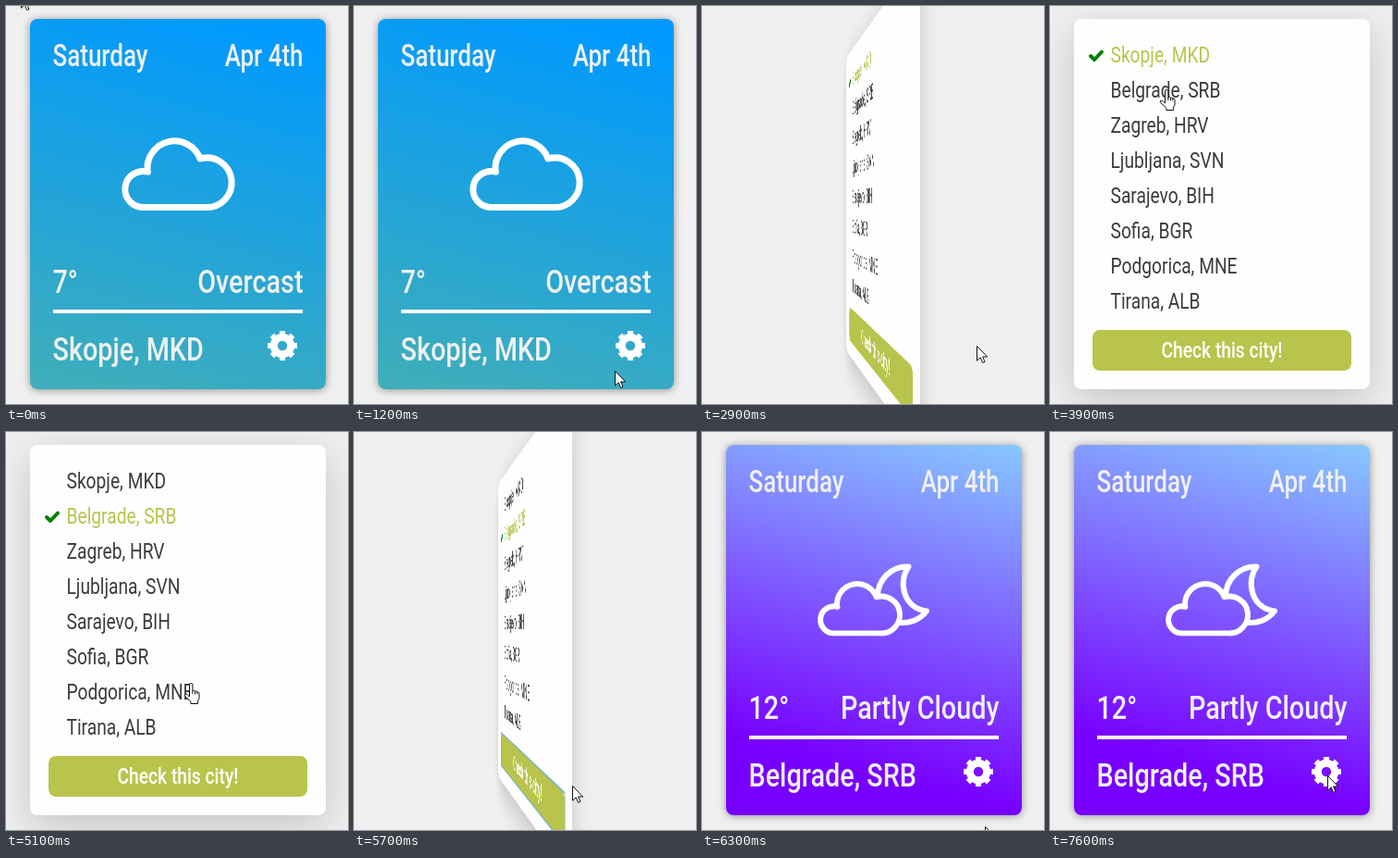
An HTML page for the animation above (8 s loop, 370x430 px).

```html
<!DOCTYPE html>
<html lang="en">
<head>
<meta charset="utf-8">
<title>Weather card</title>
<style>
  html, body { margin: 0; width: 100%; height: 100%; overflow: hidden; background: #efefef; }
  #stage { position: relative; width: 370px; height: 430px; overflow: hidden; }
  #scene { position: absolute; left: 26px; top: 14px; width: 320px; height: 400px; perspective: 600px; }
  #card { width: 100%; height: 100%; transform-style: preserve-3d; }
  .face { position: absolute; inset: 0; border-radius: 8px; backface-visibility: hidden; }
  .face svg { display: block; }
  .front {
    background: linear-gradient(15deg, #41aeb8, #0099ff 95%);
    box-shadow: 0 1px 8px rgba(0, 0, 0, .4);
  }
  .night .front { background: linear-gradient(15deg, #7800ff 18%, #87c8ff); }
  .back {
    background: #fefefe;
    box-shadow: 0 12px 44px rgba(0, 0, 0, .18);
    transform: rotateY(180deg);
  }
  text { font-family: Roboto, "Liberation Sans", sans-serif; }
  .front text { fill: #f0f0f0; font-weight: 500; }
  .back text { fill: #3c3c3c; }
  .back .picked text { fill: #b8c44c; }
  .back .button text { fill: #fff; font-weight: 500; }
  .line { fill: none; stroke: #fff; stroke-linejoin: round; }
  .tick { fill: none; stroke: #008000; stroke-width: 4; stroke-linecap: round; stroke-linejoin: round; }
  .focus { fill: none; stroke: #6aa9d8; stroke-width: 1.5; visibility: hidden; }
  .night .focus { visibility: visible; }
  .night-only, .night .day-only { display: none; }
  .night .night-only { display: inline; }
  #cursor { position: absolute; left: 0; top: 0; overflow: visible; }
  #cursor path { fill: #fff; stroke: #111; stroke-linejoin: round; }
</style>
</head>
<body>
<div id="stage">
  <div id="scene">
    <div id="card">
      <div class="face front"><svg id="front" width="320" height="400" viewBox="26 14 320 400"></svg></div>
      <div class="face back"><svg id="back" width="320" height="400" viewBox="26 14 320 400"></svg></div>
    </div>
  </div>
  <svg id="cursor" width="18" height="24">
    <path id="arrow" d="M.5 .5V16.2L4.2 12.8 6.6 18.4 9 17.4 6.6 12H11.7Z"/>
    <g id="hand" transform="translate(-7.5)">
      <path d="M6 15V2.2a1.7 1.7 0 0 1 3.4 0V8.6q1.6-.9 2.6.5 1.6-.7 2.3.8 2.2-.4 2.2 1.8v4.3q0 1.6-1.6 4v2.5H7.4v-2.3L1.2 14.6q-1.2-1.8.4-2.6 1.6-.5 4.4 3z"/>
      <path d="M9.4 8.6v3.4M12 9.1v3.2M14.3 9.9v2.6"/>
    </g>
  </svg>
</div>
<script>
const $ = id => document.getElementById(id);
const LOOP = 8000, TICK = 100, FLIP = 380, ROW = 38;
const NARROW = 0.8; // one condensed setting for all lettering

const label = (x, y, str, size = 24, anchor = 'start') =>
  `<text transform="translate(${x} ${y}) scale(${NARROW} 1)" font-size="${size}" text-anchor="${anchor}">${str}</text>`;
const left = (y, str, size) => label(50.5, y, str, size);
const right = (y, str, size) => label(321.5, y, str, size, 'end');

const cloud = 'M148.5 217.5A19.5 19.5 0 1 1 153.5 179.2L153 178A29.5 29.5 0 0 1 210 165A26.8 26.8 0 1 1 215.5 217.5Z';
const moon = 'M190 178A32 32 0 0 1 223.5 145.5C212 161 217 190 243 193.5A32 32 0 0 1 212 205.5';

const weather = (cls, temp, sky, city) => `<g class="${cls}">
  ${left(310, temp, 36)}${right(310, sky, 36)}${left(383, city, 36)}</g>`;

$('front').innerHTML = `
  ${left(65, 'Saturday', 32.5)}${right(65, 'Apr 4th', 32.5)}
  <path class="line day-only" stroke-width="7" d="${cloud}"/>
  <g class="line night-only">
    <path stroke-width="6" d="${moon}"/>
    <path stroke-width="8" transform="translate(126 220) scale(.745) translate(-126 -221)" d="${cloud}"/>
  </g>
  ${weather('day-only', '7°', 'Overcast', 'Skopje, MKD')}
  ${weather('night-only', '12°', 'Partly Cloudy', 'Belgrade, SRB')}
  <rect x="51" y="328" width="270" height="4" fill="#fff"/>
  <g class="line">
    <circle cx="299" cy="367" r="9.2" stroke-width="8"/>
    <circle cx="299" cy="367" r="13.5" stroke-width="5" pathLength="16" stroke-dasharray="1.1 .9" stroke-dashoffset=".55"/>
  </g>`;

const cities = ['Skopje, MKD', 'Belgrade, SRB', 'Zagreb, HRV', 'Ljubljana, SVN',
  'Sarajevo, BIH', 'Sofia, BGR', 'Podgorica, MNE', 'Tirana, ALB'];

$('back').innerHTML = cities.map((c, i) => `<g class="city">${label(65.5, 61 + ROW * i, c)}</g>`).join('') + `
  <path id="tick" class="tick" d="M44 54L48 58L56 49.5"/>
  <g class="button">
    <rect x="46" y="350" width="280" height="44" rx="8" fill="#b8c44c"/>
    <rect class="focus" x="46" y="350" width="280" height="44"/>
    ${label(186, 380, 'Check this city!', 24, 'middle')}
  </g>`;

const rows = document.querySelectorAll('.city');

// pointer stops: time, x, y; it eases from one to the next
const stops = [
  [100, 16, -14], [300, 2, 29],
  [1000, 272, 424], [1400, 292, 363], [2100, 293, 364], [2300, 297, 367],
  [3200, 297, 367], [3700, 125, 93], [3900, 126, 90], [4300, 150, 203], [4800, 132, 92],
  [5300, 237, 369], [5500, 237, 372], [5700, 236, 382], [5900, 258, 424],
  [6300, 306, 426], [6500, 320, 398], [7000, 300, 365], [7400, 300, 366], [7600, 300, 371]
];

const within = (t, a, b) => t >= a && t < b;

function ease(t, start, span) {
  const k = Math.min(1, Math.max(0, (t - start) / span));
  return k * k * (3 - 2 * k);
}

function pointAt(t) {
  let [t0, x, y] = stops[0];
  for (const [t1, x1, y1] of stops.slice(1)) {
    if (t <= t0) break;
    const k = ease(t, t0, t1 - t0);
    x += (x1 - x) * k;
    y += (y1 - y) * k;
    t0 = t1;
  }
  return [Math.round(x), Math.round(y)];
}

function draw(t) {
  const turn = ease(t, 2691, FLIP) - ease(t, 5529, FLIP);
  $('card').style.transform = `rotateY(${180 * turn}deg)`;
  $('card').classList.toggle('night', t >= 5500);

  const pick = t >= 4800 ? 1 : 0;
  rows.forEach((r, i) => r.classList.toggle('picked', i === pick));
  $('tick').setAttribute('transform', `translate(0 ${ROW * pick})`);

  const [x, y] = pointAt(t);
  const away = within(t, 400, 1000) || within(t, 6000, 6300);
  const hand = within(t, 3300, 5600);
  $('cursor').style.transform = `translate(${x}px, ${y}px)`;
  $('cursor').style.display = away ? 'none' : 'block';
  $('hand').style.display = hand ? 'inline' : 'none';
  $('arrow').style.display = hand ? 'none' : 'inline';
}

const begin = performance.now();
function loop() {
  const t = (performance.now() - begin) % LOOP;
  draw(Math.floor(t / TICK) * TICK);
  requestAnimationFrame(loop);
}
loop();
</script>
</body>
</html>
```
